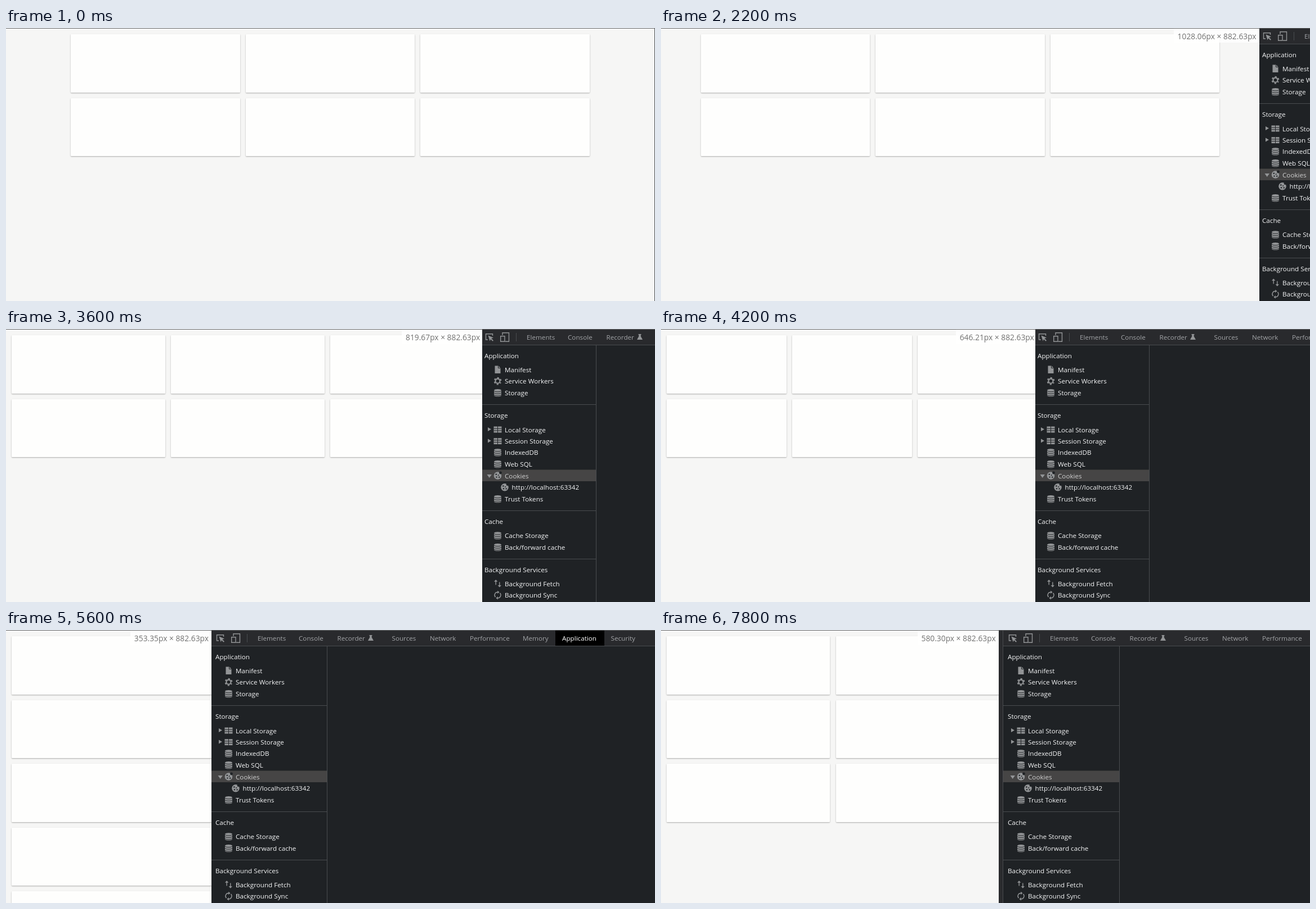
Recreate the animation shown at these times as an HTML page. Size 1153 by 486 pixels, loop 8 s.

```html
<!DOCTYPE html>
<html lang="en">
<head>
<meta charset="utf-8">
<title>Responsive cards</title>
<style>
  html, body { margin: 0; width: 100%; height: 100%; overflow: hidden; background: #292a2d; }
  body { position: relative; font-family: "Open Sans", "Noto Sans", sans-serif; }
  div, svg { position: absolute; }
  #page, #panel { top: 0; height: 486px; overflow: hidden; }
  #page { left: 0; background: #f6f6f5; }
  #panel { right: 0; background: #1f2225; }
  #topline { left: 0; top: 0; width: 100%; height: 1px; background: #66686a; }
  .card { height: 103.6px; background: #fefefd; border-radius: 1px;
    box-shadow: 0 1px 3px rgba(0,0,0,.1), 0 1px 2px rgba(0,0,0,.22); }
  #label { top: 0; right: 0; height: 26px; padding: 0 5.4px 0 7px; background: rgba(255,255,255,.8);
    color: #707070; font-size: 13.8px; line-height: 29px; white-space: nowrap; }
  svg { top: 0; width: 1200px; height: 486px; font-size: 11.68px; fill: #f5f6f7; }
  .tab { fill: #a3a5a8; }
  .rule { fill: #494c4f; }
  .icon { fill: #929496; }
  .cut { fill: #1f2225; }
  .line { fill: none; stroke: #929496; stroke-width: 1.4; }
  .gap { fill: none; stroke: #1f2225; }
</style>
</head>
<body>
<div id="page"><div id="label"></div></div>
<div id="panel">
  <svg>
    <defs>
      <g id="file"><path class="icon" d="M-5-6.7H1.2L5-3V6.7H-5z"/><path class="gap" d="M1-6.5V-2.7H5"/></g>
      <g id="gear" class="line">
        <circle r="4" stroke-width="2.2"/>
        <circle r="5.9" stroke-width="2" stroke-dasharray="3 3.178" stroke-dashoffset="1.5" transform="rotate(30)"/>
      </g>
      <g id="database">
        <path class="icon" d="M-6.5-4.3C-6.5-7.4 6.5-7.4 6.5-4.3V4.3C6.5 7.4-6.5 7.4-6.5 4.3z"/>
        <path class="gap" d="M-6.5-3.7C-5-1.3 5-1.3 6.5-3.7M-6.5-.2C-5 2.2 5 2.2 6.5-.2M-6.5 3.3C-5 5.7 5 5.7 6.5 3.3"/>
      </g>
      <g id="table">
        <rect class="icon" x="-7" y="-5.5" width="14" height="11"/>
        <path class="gap" d="M-7-1.8H7M-7 1.9H7M0-6V6"/>
      </g>
      <g id="cookie">
        <circle class="icon" r="6.8"/>
        <g class="cut"><circle cx="-2.7" cy="-2.2" r="1.3"/><circle cx="-2" cy="2.6" r="1.2"/>
        <circle cx="2.7" cy="2.7" r="1.2"/><circle cx="1.2" cy="-.8" r="1"/><circle cx="5" cy="-5" r="2.4"/></g>
      </g>
      <g id="fetch">
        <path class="line" d="M-3.3-4V2.5M3.3-2.5V4"/>
        <path class="icon" d="M-6.5-3.2L-3.3-6.8L-.1-3.2zM.1 3.2L3.3 6.8L6.5 3.2z"/>
      </g>
      <g id="sync">
        <path class="line" d="M-4 3.6A5.2 5.2 0 0 1 0-5.2M4-3.6A5.2 5.2 0 0 1 0 5.2"/>
        <path class="icon" d="M-.3-8V-2.4L3-5.2zM.3 8V2.4L-3 5.2z"/>
      </g>
    </defs>
    <g id="tools"></g>
  </svg>
</div>
<div id="topline"></div>
<script>
const SCALE = 1.034, STEP = 200, LOOP = 8000;
const $ = id => document.getElementById(id);
const text = (x, y, s, attrs = '') => `<text x="${x}" y="${y}" ${attrs}>${s}</text>`;
const rect = (x, y, w, h, attrs) => `<rect x="${x}" y="${y}" width="${w}" height="${h}" ${attrs}/>`;

const TABS = [['Elements', 84], ['Console', 157], ['Recorder', 225.5], ['Sources', 322.5], ['Network', 390],
  ['Performance', 461], ['Memory', 555], ['Application', 625], ['Security', 711.5]];
const TITLES = [['Application', 48], ['Storage', 154], ['Cache', 343], ['Background Services', 429]];
// name, centre y, icon, indent
const ITEMS = [['Manifest', 72.5, 'file'], ['Service Workers', 93, 'gear'], ['Storage', 114, 'database'],
  ['Local Storage', 179.3, 'table'], ['Session Storage', 200, 'table'], ['IndexedDB', 220.2, 'database'],
  ['Web SQL', 241, 'database'], ['Cookies', 261.3, 'cookie'], ['http://localhost:63342', 282, 'cookie', 12.5],
  ['Trust Tokens', 303, 'database'], ['Cache Storage', 368.2, 'database'], ['Back/forward cache', 389, 'database'],
  ['Background Fetch', 453.3, 'fetch'], ['Background Sync', 474, 'sync']];

function buildTools() {
  let out = rect(0, 0, 1200, 28, 'fill="#292a2d"') + rect(0, 28, 1200, 1, 'class="rule"')
    + rect(613, 1, 87, 27, 'fill="#000"') + rect(65, 7, 1, 15, 'class="rule"')
    + rect(0, 250.5, 207, 20.5, 'fill="#464545"') + rect(207, 28, 1, 458, 'class="rule"')
    + rect(0, 0, 1, 486, 'class="rule"');
  for (const y of [134, 323, 409]) out += rect(0, y, 207, 1, 'class="rule"');
  // inspect, device and flask icons
  out += `<path class="line" d="M15 19H11.5V8.7H23.5V12"/><path class="icon" d="M15.5 11.5L25 15.5L21.3 16.8L25 20.5L23.6 21.8L20 18.2L18.6 21.5z"/>
    <path class="line" d="M41 11V6.7H52.5V22.3H46M37.7 12.7H45V22.3H37.7z"/>
    <path class="icon" d="M282.5 9H287.5V10.5H286.7V13L290 19H280L283.3 13V10.5H282.5z"/>`;
  for (const [name, x] of TABS)
    out += text(x, 19, name, name === 'Application' ? 'fill="#fff"' : 'class="tab"');
  for (const [name, y] of TITLES) out += text(9, y + 4.2, name);
  for (const [name, y, icon, indent = 0] of ITEMS)
    out += `<use href="#${icon}" x="${32.5 + indent}" y="${y - .3}"/>`
      + text(45 + indent, y + 4.2, name, name === 'Cookies' ? 'fill="#cfcfcf"' : '');
  out += '<path class="icon" d="M15 175L21 178.5L15 182zM15 195.5L21 199L15 202.5zM13.5 259H22L17.7 265z"/>';
  $('tools').innerHTML = out;
}

// time, page width in CSS px, change per step
const DRAG = [[1200, 1114.12, 0], [2200, 1028.06, -29], [3000, 909.13, -8], [4200, 646.21, -64],
  [5000, 455.64, -40], [5800, 343.3, 0], [6800, 343.3, 0], [7000, 351.04, 8], [7800, 580.3, 54]];

// Hermite curve through the drag points
function widthAt(t) {
  t = Math.max(t, DRAG[0][0]);
  const i = Math.min(DRAG.findLastIndex(k => k[0] <= t), DRAG.length - 2);
  const [t0, a, va] = DRAG[i], [t1, b, vb] = DRAG[i + 1];
  const s = (t - t0) / (t1 - t0), n = (t1 - t0) / STEP, r = 1 - s;
  return r * r * (1 + 2 * s) * a + s * r * r * n * va + s * s * (3 - 2 * s) * b - s * s * r * n * vb;
}

const cards = Array.from({ length: 6 }, () => {
  const card = document.createElement('div');
  card.className = 'card';
  $('page').insertBefore(card, $('label'));
  return card;
});

function draw(time) {
  const t = Math.floor(time % LOOP / STEP) * STEP;
  const width = widthAt(t), page = width * SCALE;
  const speed = t <= 1200 ? 0 : (widthAt(t + 1) - widthAt(t - 1)) * STEP / 2;

  // the tools run ahead of the page while dragging
  const tools = Math.round(page + speed * SCALE / 8);
  const edge = Math.max(tools, Math.min(Math.round(page), tools + 5));
  $('page').style.width = page + 'px';
  $('panel').style.left = edge + 'px';
  $('tools').setAttribute('transform', `translate(${tools - edge})`);

  const cols = width > 600 ? 3 : width > 400 ? 2 : 1;
  const cardWidth = Math.min(page / cols - 10, cols === 3 ? 300.3 : page);
  const left = Math.max(10.3, (page - cols * (cardWidth + 10.3) + 10.3) / 2);
  cards.forEach((card, i) => {
    card.style.left = left + i % cols * (cardWidth + 10.3) + 'px';
    card.style.top = 11.2 + Math.floor(i / cols) * 113.5 + 'px';
    card.style.width = cardWidth + 'px';
  });

  const resizing = t >= 1400 && t < 6600 || t >= 7000;
  $('label').style.display = resizing ? '' : 'none';
  $('label').textContent = `${width.toFixed(2)}px × 882.63px`;
}

buildTools();
const start = performance.now();
(function tick() {
  draw(performance.now() - start);
  requestAnimationFrame(tick);
})();
</script>
</body>
</html>
```
